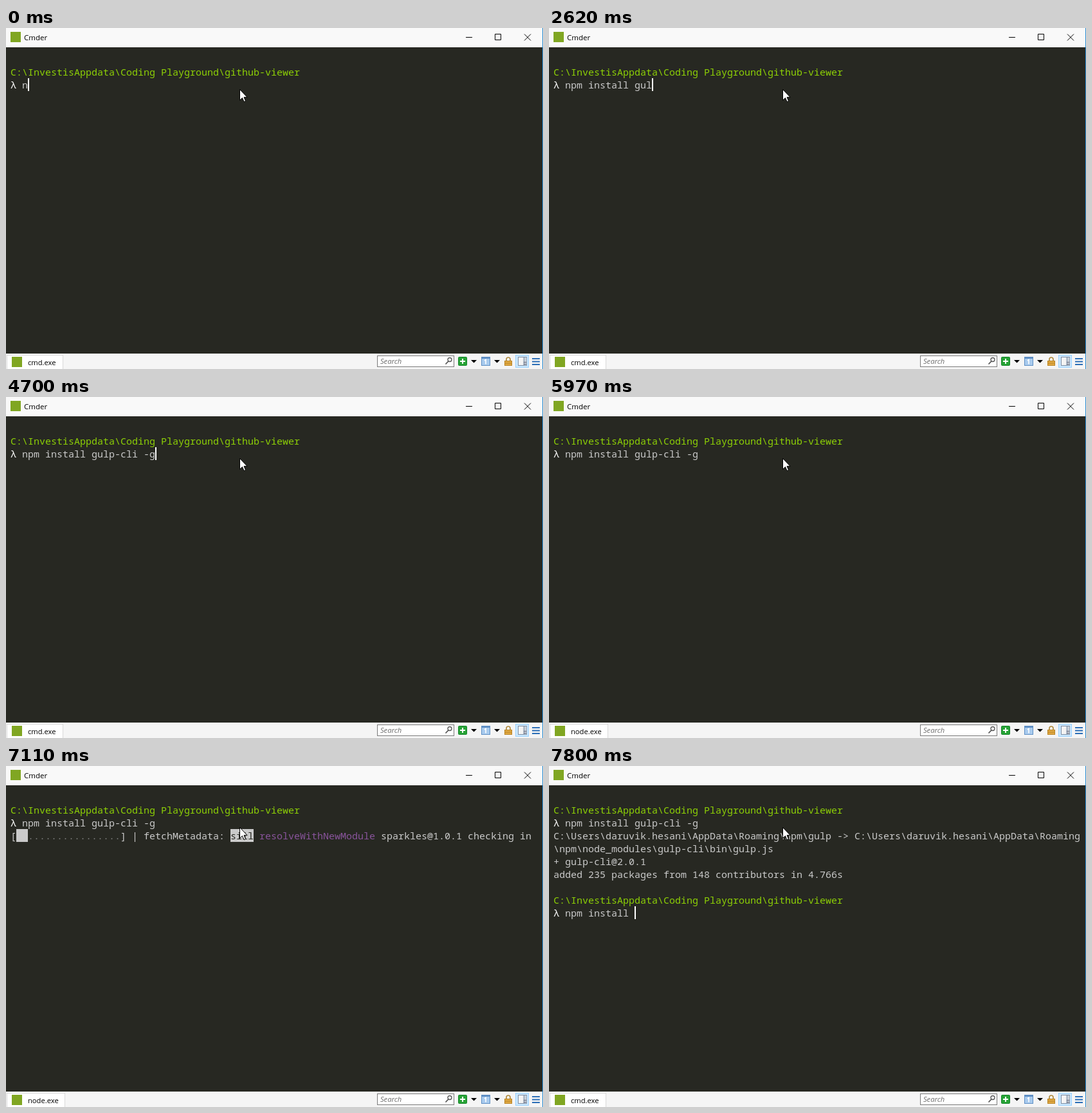
Write an HTML page that moves like this. It is 835x530 px and loops after 8000 ms.

```html
<!DOCTYPE html>
<html lang="en">
<head>
<meta charset="utf-8">
<title>Terminal</title>
<style>
html, body { margin: 0; width: 100%; height: 100%; overflow: hidden; background: #272822; }
#stage { position: relative; width: 835px; height: 530px; overflow: hidden; background: #272822; }
#rows { position: absolute; left: 7px; top: 58px; margin: 0; font: 15px/20px "Noto Sans Mono", monospace; color: #cacaca; }
#rows div { height: 20px; white-space: pre; }
.path { color: #8dd006; }
.lamb { color: #fff; }
.dim { color: #7c7c7c; }
.blue { color: #01549e; }
.mag { color: #89549c; }
.inv { color: #272822; background: #cacaca; }
#caret { position: absolute; width: 2px; height: 20px; background: #fff; }
svg { position: absolute; left: 0; top: 0; font-family: "Open Sans", sans-serif; }
</style>
</head>
<body>
<div id="stage">
  <div id="rows"></div>
  <div id="caret"></div>
  <svg width="835" height="530" viewBox="0 0 835 530">
    <!-- title bar -->
    <rect width="835" height="30" fill="#f9f9f9"/>
    <rect x="7" y="6" width="16" height="16" fill="#80a622"/>
    <text x="28" y="19" font-size="11.5">Cmder</text>
    <g fill="none" stroke="#000">
      <path d="M715 14.5h10M760.5 9.5h9v9h-9z"/>
      <path d="M806 9.5l10 10M816 9.5l-10 10"/>
    </g>

    <!-- status bar -->
    <rect y="506" width="835" height="24" fill="#f5f5f5"/>
    <rect id="tab" x="1.5" y="508.5" width="87" height="24" fill="#fff" stroke="#d9d9d9"/>
    <rect x="9" y="511" width="16" height="16" fill="#80a622"/>
    <text id="exe" x="34" y="524" font-size="11.2">cmd.exe</text>
    <rect x="577.5" y="509.5" width="119" height="17" fill="#fff" stroke="#7a7a7a"/>
    <text x="582" y="522" font-size="11.2" font-style="italic" fill="#6d6d6d">Search</text>
    <g fill="none" stroke="#555" stroke-width="1.3">
      <circle cx="690" cy="515.5" r="3"/>
      <path d="M687.8 518l-4.3 4.5" stroke-width="1.8"/>
    </g>
    <rect x="703.5" y="511.5" width="13" height="13" rx="1" fill="#27a336" stroke="#14862a"/>
    <path d="M710 514v8M706 518h8" stroke="#fff" stroke-width="2"/>
    <path d="M723 516h9l-4.5 4.5zM759 516h9l-4.5 4.5z"/>
    <rect x="739.5" y="511.5" width="13" height="13" fill="#a9cbee" stroke="#5f8fc4"/>
    <path d="M740 513h12" stroke="#5f8fc4" stroke-width="2"/>
    <path d="M744 517l2-1.5v7" fill="none" stroke="#fff" stroke-width="1.6"/>
    <path d="M778 518v-3a3 3 0 0 1 6 0v3" fill="none" stroke="#b08a3c" stroke-width="1.7"/>
    <rect x="775.5" y="517.5" width="11" height="7" fill="#dfa842" stroke="#b98425"/>
    <path d="M776 521h10" stroke="#b98425"/>
    <rect x="792.5" y="508.5" width="20" height="19" fill="#cce8ff" stroke="#99d1ff"/>
    <rect x="796.5" y="511.5" width="13" height="13" fill="#f4f4f4" stroke="#7d8ea3"/>
    <path d="M806 512v12" stroke="#b4bfcc" stroke-width="4"/>
    <path d="M805 519.5h4M805 522.5h4" stroke="#667"/>
    <path d="M818 514h12M818 518.5h12M818 523h12" stroke="#2d6fb7" stroke-width="2"/>

    <rect x="834" width="1" height="530" fill="#2a8dd4"/>
    <!-- pointer -->
    <path d="M363.5 95.5v16.8l3.9-3.7 2.7 6 2.5-1.1-2.6-5.8h5.1z" fill="#fff" stroke="#000"/>
  </svg>
</div>
<script>
const LOOP = 8000, CELL = 9, ROW = 20;
const COMMAND = 'npm install gulp-cli -g';
const $ = id => document.getElementById(id);
const span = (cls, text) => `<span class="${cls}">${text}</span>`;
const PATH = span('path', 'C:\\InvestisAppdata\\Coding Playground\\github-viewer');
const HOME = 'C:\\Users\\daruvik.hesani\\AppData\\Roaming';
const prompt = text => [PATH, span('lamb', 'λ') + ' ' + text];
const entered = prompt(COMMAND);

// caret: [column, row] or null
const typed = n => ({ rows: prompt(COMMAND.slice(0, n)), caret: [n + 2, 1] });
const wait = (exe, on) => ({ rows: entered, caret: on ? [0, 2] : null, exe });
const bar = (done, spin, rest) => ({
  rows: [...entered,
    '[' + span('inv', ' '.repeat(done)) + span('dim', '.'.repeat(18 - done)) + `] ${spin} ` + rest],
  exe: 'node.exe'
});
const fetching = spin => bar(2, spin, 'fetchMetadata: ' + span('inv', 'sill') + ' ' +
  span('mag', 'resolveWithNewModule') + ' sparkles@1.0.1 checking in');
const finished = n => ({
  rows: [...entered,
    `${HOME}\\npm\\gulp -&gt; ${HOME}`,
    '\\npm\\node_modules\\gulp-cli\\bin\\gulp.js',
    '+ gulp-cli@2.0.1',
    'added 235 packages from 148 contributors in 4.766s',
    '',
    ...prompt(COMMAND.slice(0, n))],
  caret: [n + 2, 8]
});

const steps = [];
const at = (time, state) => steps.push({ time, ...state });
// types from one length to another, evenly spaced in time
const type = (start, end, from, to) => {
  for (let n = from; n <= to; n++)
    at(start + (end - start) * (n - from) / (to - from), typed(n));
};

at(0, typed(1));
type(280, 430, 2, 3);
at(840, typed(4));
at(980, typed(5));
at(1120, typed(7));
at(1390, typed(8));
type(1660, 2330, 9, 14);
at(2620, typed(15));
at(3170, typed(16));
at(3610, typed(17));
at(3800, typed(18));
at(4000, typed(20));
type(4430, 4700, 21, 23);
at(5260, { rows: entered });
at(5420, wait('cmd.exe', true));
at(5720, wait('node.exe', true));
at(5970, wait('node.exe', false));
at(6530, wait('node.exe', true));
at(6680, bar(0, '/', 'rollbackFailedOptional: ' + span('blue', 'verb') + ' ' +
  span('mag', 'npm-session') + ' 9c87cbb0a9c2f5e5'));
at(6960, fetching('\\'));
at(7110, fetching('|'));
at(7250, finished(9));
at(7390, finished(10));
at(7670, finished(11));
at(7800, finished(12));

let shown;
function draw() {
  const t = performance.now() % LOOP;
  const step = steps.filter(s => s.time <= t).pop();
  if (step !== shown) {
    shown = step;
    const { rows, caret, exe = 'cmd.exe' } = step;
    $('rows').innerHTML = rows.map(r => `<div>${r}</div>`).join('');
    $('caret').style.display = caret ? 'block' : 'none';
    if (caret) {
      $('caret').style.left = 7 + caret[0] * CELL + 'px';
      $('caret').style.top = 58 + caret[1] * ROW + 'px';
    }
    $('exe').textContent = exe;
    $('tab').setAttribute('width', exe === 'cmd.exe' ? 87 : 90);
  }
  requestAnimationFrame(draw);
}
draw();
</script>
</body>
</html>
```
